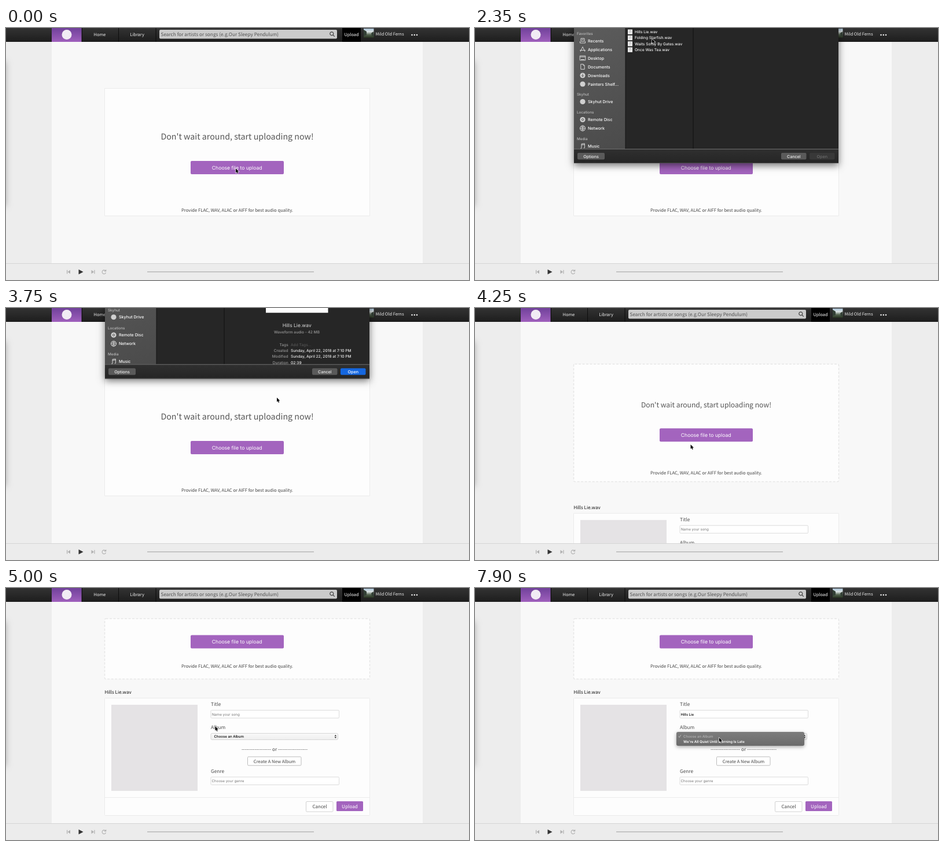
Recreate the animation shown at these times as an HTML page with a canvas. Size 800 by 436 pixels, loop 8 s.

```html
<!DOCTYPE html>
<html lang="en">
<head>
<meta charset="utf-8">
<title>Upload a song</title>
<style>
html, body { margin: 0; width: 100%; height: 100%; overflow: hidden; background: #ededed; }
canvas { display: block; width: 800px; height: 436px; }
</style>
</head>
<body>
<canvas id="stage"></canvas>
<script>
const LOOP = 8000;
const SANS = '"Noto Sans CJK SC", "Noto Sans CJK JP", "Noto Sans CJK", "Noto Sans", sans-serif';
const UI = 'Inter, Roboto, sans-serif';
const PURPLE = '#a364be';
const SONG = 'Hills Lie';
const FILES = [SONG, 'Folding Starfish', 'Waits Softly By Gates', 'Once Was Tea'];

const canvas = document.getElementById('stage');
const ratio = window.devicePixelRatio || 1;
canvas.width = 800 * ratio;
canvas.height = 436 * ratio;
const c = canvas.getContext('2d');

// Timing helpers
const clamp = v => Math.min(1, Math.max(0, v));
const progress = (t, from, to) => clamp((t - from) / (to - from));
const smooth = v => v * v * (3 - 2 * v);
const easeOut = v => 1 - (1 - v) ** 2;
const mix = (a, b, p) => a + (b - a) * p;

// Drawing helpers
function text(str, x, y, size, color, { font = SANS, align = 'left', weight = 400 } = {}) {
  c.font = `${weight} ${size}px ${font}`;
  c.textAlign = align;
  c.fillStyle = color;
  c.fillText(str, x, y + size * 0.365); // y is the middle of the capitals
}

const ui = (str, x, y, size, color, weight = 400, align = 'left') =>
  text(str, x, y, size, color, { font: UI, weight, align });

function box(x, y, w, h, fill, { stroke, r = 0, line = 1, dash = [] } = {}) {
  c.beginPath();
  c.roundRect(x, y, w, h, r);
  if (fill) { c.fillStyle = fill; c.fill(); }
  if (stroke) {
    c.setLineDash(dash);
    c.lineWidth = line;
    c.strokeStyle = stroke;
    c.stroke();
    c.setLineDash([]);
  }
}

function disc(x, y, r, color) {
  c.beginPath();
  c.arc(x, y, r, 0, 7);
  c.fillStyle = color;
  c.fill();
}

function path(d, x, y, { fill, stroke, line = 1 }) {
  c.save();
  c.translate(x, y);
  const p = new Path2D(d);
  if (stroke) { c.strokeStyle = stroke; c.lineWidth = line; c.stroke(p); }
  if (fill) { c.fillStyle = fill; c.fill(p); }
  c.restore();
}

function gradient(x0, y0, x1, y1, ...colors) {
  const g = c.createLinearGradient(x0, y0, x1, y1);
  colors.forEach((color, i) => g.addColorStop(i / (colors.length - 1), color));
  return g;
}

function clipped(x, y, w, h, draw) {
  c.save();
  c.beginPath();
  c.rect(x, y, w, h);
  c.clip();
  draw();
  c.restore();
}

// Page
function background() {
  box(0, 0, 800, 436, '#ededed');
  box(79, 0, 641, 436, '#f8f8f8');
  c.save();
  c.shadowColor = 'rgba(0,0,0,.3)';
  c.shadowBlur = 12 * ratio;
  box(-20, 58, 19, 250, '#ccc');
  c.restore();
}

function navigation() {
  box(0, 0, 800, 24, gradient(0, 0, 0, 24, '#333', '#1d1d1d'));
  box(79, 0, 51.5, 24, gradient(0, 0, 0, 24, '#70419a', '#a060bd'));
  disc(105, 11.5, 8.5, '#f1ebf4');
  [131, 194, 258.5].forEach(x => box(x, 0, 1, 24, '#0d0d0d'));
  text('Home', 162, 11, 7.4, '#eee', { align: 'center' });
  text('Library', 226.5, 11, 7.5, '#eee', { align: 'center' });

  box(265, 3, 307, 15.5, '#cbcbcb', { r: 2 });
  text('Search for artists or songs (e.g.Our Sleepy Pendulum)', 267.5, 11, 8.25, '#505050');
  path('M3 0A3 3 0 1 1 -3 0A3 3 0 1 1 3 0M2.2 2.2L5 5', 562.8, 9.8, { stroke: '#444', line: 1.2 });

  box(581, 0, 32, 24, '#000');
  text('Upload', 597, 11, 7.4, '#fff', { align: 'center' });
  box(618, 1, 17.5, 16, gradient(0, 1, 0, 17, '#a9c3d8', '#dde4e5', '#53634f', '#25301f'));
  path('M0 0L5 3L5 9L0 11Z M17 3L13 6L14 11H17Z', 618, 3, { fill: '#334036' });
  text('Mild Old Ferns', 638.5, 10.5, 7.4, '#eee');
  [701.5, 705.8, 710].forEach(x => disc(x, 12, 1.3, '#eee'));
}

function player() {
  box(0, 407, 800, 29, '#ececec');
  box(0, 407, 800, 1, '#d5d5d5');
  path('M6 -3.3V3.3L1.5 0ZM0 -3.3H1.2V3.3H0Z', 105, 422, { fill: '#b0b0b0' });
  path('M0 -4.3L8 0L0 4.3Z', 125.5, 422, { fill: '#333' });
  path('M0 -3.3V3.3L4.5 0ZM4.8 -3.3H6V3.3H4.8Z', 147.5, 422, { fill: '#b0b0b0' });
  path('M2.6 -2A3.3 3.3 0 1 0 3.2 1.2M3.4 -4V-1.4H.6', 169.3, 422, { stroke: '#b0b0b0', line: 1.1 });
  box(244, 421.3, 288, 1.3, '#adadad');
}

function uploadBox(p, started) {
  const top = mix(104.5, 53, p), bottom = mix(325, 157.5, p);
  const buttonY = mix(241.5, 93, p);
  const border = started
    ? { stroke: '#e7e7e7', line: 1.5, dash: [4, 2.5], r: 2 }
    : { stroke: '#ebebeb' };
  box(170.5, top, 458, bottom - top, '#fdfdfd', border);
  const size = 14.25 * (1 - p);
  if (size > 0.3) {
    text("Don't wait around, start uploading now!", 399.5, mix(187.5, 52, p), size, '#555', { align: 'center' });
  }
  box(319, buttonY - 11.5, 161, 23, PURPLE, { r: 2 });
  ui('Choose file to upload', 399.2, buttonY, 8.65, '#fff', 400, 'center');
  const inset = mix(10, 22, clamp(p * 3));
  text('Provide FLAC, WAV, ALAC or AIFF for best audio quality.', 399.5, bottom - inset, 7.64, '#444', { align: 'center' });
}

function songForm(t, p) {
  const field = y => box(354, y, 221.5, 13.5, '#fff', { stroke: '#dcdcdc', r: 1.5 });
  const label = (str, y) => text(str, 354, y, 8.3, '#4a4a4a');
  c.save();
  c.translate(0, (1 - p) * 193);
  text(SONG + '.wav', 170.5, 180.5, 8, '#111', { weight: 500 });
  box(170.5, 190.5, 458, 203, '#fdfdfd', { stroke: '#ebebeb', r: 1 });
  box(182, 202, 149, 149, '#e5e3e5');

  label('Title', 201);
  field(211.5);
  const count = t < 6050 ? 0 : Math.min(SONG.length, 1 + Math.floor((t - 6050) / 105));
  const typed = SONG.slice(0, count);
  if (count) ui(typed, 355.5, 218.5, 6.1, '#000', 500);
  else ui('Name your song', 355.7, 218.5, 6.2, '#757575');
  if (t > 5450 && t < 7450) {
    c.font = `500 6.1px ${UI}`;
    box(356 + c.measureText(typed).width, 214.5, 0.8, 8, '#000');
  }

  label('Album', 241);
  box(354, 251.5, 219.5, 11, gradient(0, 251, 0, 263, '#fafafa', '#eee'), { stroke: '#d6d6d6', r: 2 });
  ui('Choose an Album', 359.5, 257, 6.1, '#000', 500);
  path('M-1.7 -.8L0 -3L1.7 -.8ZM-1.7 .8L0 3L1.7 .8Z', 569.3, 257, { fill: '#222' });

  const dashes = '-'.repeat(18);
  text(`${dashes} or ${dashes}`, 464, 279, 8.2, '#4a4a4a', { align: 'center' });
  box(417.5, 292, 92.5, 15, '#fff', { stroke: '#bbb', r: 1.5 });
  text('Create A New Album', 464, 300, 7.7, '#444', { align: 'center' });
  label('Genre', 317);
  field(327);
  ui('Choose your genre', 355.5, 334, 6.2, '#757575');

  box(171, 362, 457, 1, '#ececec');
  box(518.5, 369.5, 46.5, 17.5, '#fff', { stroke: '#d2d2d2', r: 1.5 });
  text('Cancel', 542, 378.5, 8.05, '#444', { align: 'center' });
  box(571, 369, 46, 17, PURPLE, { r: 1.5 });
  text('Upload', 594, 378, 8.2, '#fff', { align: 'center' });
  c.restore();
}

function albumMenu() {
  c.save();
  c.shadowColor = 'rgba(0,0,0,.35)';
  c.shadowBlur = 6 * ratio;
  c.shadowOffsetY = 2 * ratio;
  box(348, 249, 221, 24, gradient(0, 249, 0, 273, '#7c7c7c', '#6b6b6b'), { r: 3 });
  c.restore();
  path('M-2 0L-.6 2L2.2 -2.4', 353.7, 256.5, { stroke: '#c0c0c0', line: 0.9 });
  ui('Choose an Album', 360, 257, 6.1, '#b4b4b4', 500);
  ui("We're All Quiet Until Morning Is Late", 360, 265.8, 6.1, '#fff', 600);
}

// File dialog
const CIRCLE = 'M4.6 0A4.6 4.6 0 1 1 -4.6 0A4.6 4.6 0 1 1 4.6 0';
const ICONS = {
  tray: ['M-3 -4H3V1H-3ZM-4.5 1V4H4.5V1M-1.5 -2H1.5'],
  tools: ['M-4 4L0 -4.5L4 4M-5 1.5H5'],
  screen: ['M-4.8 -3.8H4.8V3.8H-4.8ZM-4.8 -2H4.8M-3 2.5H3'],
  page: ['M-3.2 -4.4H1L3.2 -2.2V4.4H-3.2ZM1 -4.4V-2.2H3.2'],
  globe: [CIRCLE + 'M-4.6 0H4.6M0 -4.6V4.6M-3.4 -2.8Q0 -1 3.4 -2.8M-3.4 2.8Q0 1 3.4 2.8'],
  arrow: [CIRCLE, 'M0 -2.6V2M-2 .2L0 2.2L2 .2'],
  ring: [CIRCLE, 'M1.7 0A1.7 1.7 0 1 1 -1.7 0A1.7 1.7 0 1 1 1.7 0'],
  dot: [CIRCLE, ''],
  note: ['M-2 3.2V-4L3.4 -4.6V2.6M-2 -2.2L3.4 -2.8M-3.6 3.6H-2M1.8 3H3.4'],
};
const SIDEBAR = [
  [9.5, 'Favorites'], [22, 'Recents', 'tray'], [37, 'Applications', 'tools'],
  [52, 'Desktop', 'screen'], [67, 'Documents', 'page'], [82, 'Downloads', 'arrow'],
  [97, 'Painters Shelf...', 'dot'], [115, 'Skyhut'], [127.5, 'Skyhut Drive', 'dot'],
  [146, 'Locations'], [158.5, 'Remote Disc', 'ring'], [173.5, 'Network', 'globe'],
  [191.5, 'Media'], [204.5, 'Music', 'note'],
];

function sidebar() {
  box(171, 0, 89, 209, gradient(171, 0, 260, 209, '#5c5c5c', '#4b4b4b'));
  for (const [y, name, icon] of SIDEBAR) {
    if (!icon) { ui(name, 176, y, 6.3, '#bdbdbd', 500); continue; }
    const [shape, inner] = ICONS[icon];
    if (inner === undefined) path(shape, 186, y, { stroke: '#d6d6d6' });
    else {
      path(shape, 186, y, { fill: '#d0d0d0' });
      path(inner, 186, y, { stroke: '#505050' });
    }
    ui(name, 195, y, 7.1, '#fff', 500);
  }
}

function preview() {
  box(449, 14, 107.5, 106, '#fff');
  ui(SONG + '.wav', 502.7, 141.5, 8.5, '#dcdcdc', 400, 'center');
  ui('Waveform audio - 42 MB', 502.5, 153.7, 6.6, '#8c8c8c', 600, 'center');
  const date = 'Sunday, April 22, 2018 at 7:10 PM';
  const rows = [['Tags', 'Add Tags...'], ['Created', date], ['Modified', date], ['Duration', '02:39']];
  rows.forEach(([name, value], i) => {
    const y = 175.2 + i * 10.3;
    ui(name, 487.7, y, 6.6, '#959595', 500, 'right');
    ui(value, 492, y, 6.6, i ? '#eee' : '#555', 500);
  });
}

function dialogButton(label, x, w, fill, color) {
  box(x, 216, w, 11.5, fill, { r: 2 });
  ui(label, x + w / 2, 222, 7.15, color, 500, 'center');
}

function dialog(offset, selected) {
  c.save();
  c.translate(0, offset);
  c.save();
  c.shadowColor = 'rgba(0,0,0,.55)';
  c.shadowBlur = 12 * ratio;
  c.shadowOffsetY = 4 * ratio;
  box(171, -20, 457, 254, '#262626');
  c.restore();
  clipped(171, 0, 457, 209, () => {
    sidebar();
    box(259.5, 0, 1, 209, '#151515');
    box(376.5, 0, 1, 209, '#0e0e0e');
    if (selected) box(260.5, 1.5, 116, 10.3, '#1059cf');
    FILES.forEach((name, i) => {
      const y = 6.7 + i * 10.3;
      box(264, y - 4.2, 8, 8.4, '#ececec');
      path('M-1 2V-2L1.5 -2.3V1.5', 268, y, { stroke: '#aaa', line: 0.7 });
      ui(name + '.wav', 276, y, 6.6, '#f2f2f2', 500);
    });
    if (selected) preview();
  });
  box(171, 209, 457, 25, gradient(0, 209, 0, 234, '#303030', '#252525'));
  box(171, 209, 457, 1, '#6e6e6e');
  box(171, 233.2, 457, 0.8, '#555');
  dialogButton('Options', 177, 47, '#5a5a5a', '#f0f0f0');
  dialogButton('Cancel', 529, 43.5, '#5a5a5a', '#f0f0f0');
  if (selected) dialogButton('Open', 578, 43.5, '#1567e0', '#fff');
  else dialogButton('Open', 578, 43.5, '#383838', '#6c6c6c');
  c.restore();
}

// Mouse pointer: time, x, y
const POINTER = [
  [0, 397, 243], [1100, 397, 243], [1700, 312, 50], [2050, 306, 21], [2350, 306, 19],
  [2700, 304.5, 6], [3000, 304.5, 6], [3400, 598, 220], [3600, 598, 220],
  [3750, 468, 155], [4050, 390, 225], [4500, 348.5, 251.5], [4800, 348.5, 251.5],
  [5300, 385, 217], [7100, 385, 217], [7400, 420, 256], [7900, 422, 259],
];

function pointer(t) {
  if (t > 6000 && t < 7100) return; // hidden while typing
  let i = POINTER.findIndex(key => key[0] > t);
  if (i < 0) i = POINTER.length - 1;
  const [t0, x0, y0] = POINTER[i - 1], [t1, x1, y1] = POINTER[i];
  const p = smooth(progress(t, t0, t1));
  path('M0 0V7.6L1.7 6L2.9 8.8L4.2 8.2L3 5.5H5.4Z', mix(x0, x1, p), mix(y0, y1, p),
    { fill: '#000', stroke: '#fff', line: 1.1 });
}

function draw(t) {
  c.setTransform(ratio, 0, 0, ratio, 0, 0);
  c.textRendering = 'geometricPrecision';
  const started = t >= 4190;
  const p = easeOut(progress(t, 4190, 4990));
  background();
  uploadBox(p, started);
  if (started) songForm(t, p);
  navigation();
  player();
  if (t >= 7500) albumMenu();
  if (t > 50 && t < 3860) {
    const hidden = t < 3000 ? 1 - easeOut(progress(t, 50, 350)) : smooth(progress(t, 3650, 3860));
    dialog(-237 * hidden, t >= 2850);
  }
  pointer(t);
}

function tick() {
  draw(performance.now() % LOOP);
  requestAnimationFrame(tick);
}
tick();
</script>
</body>
</html>
```
